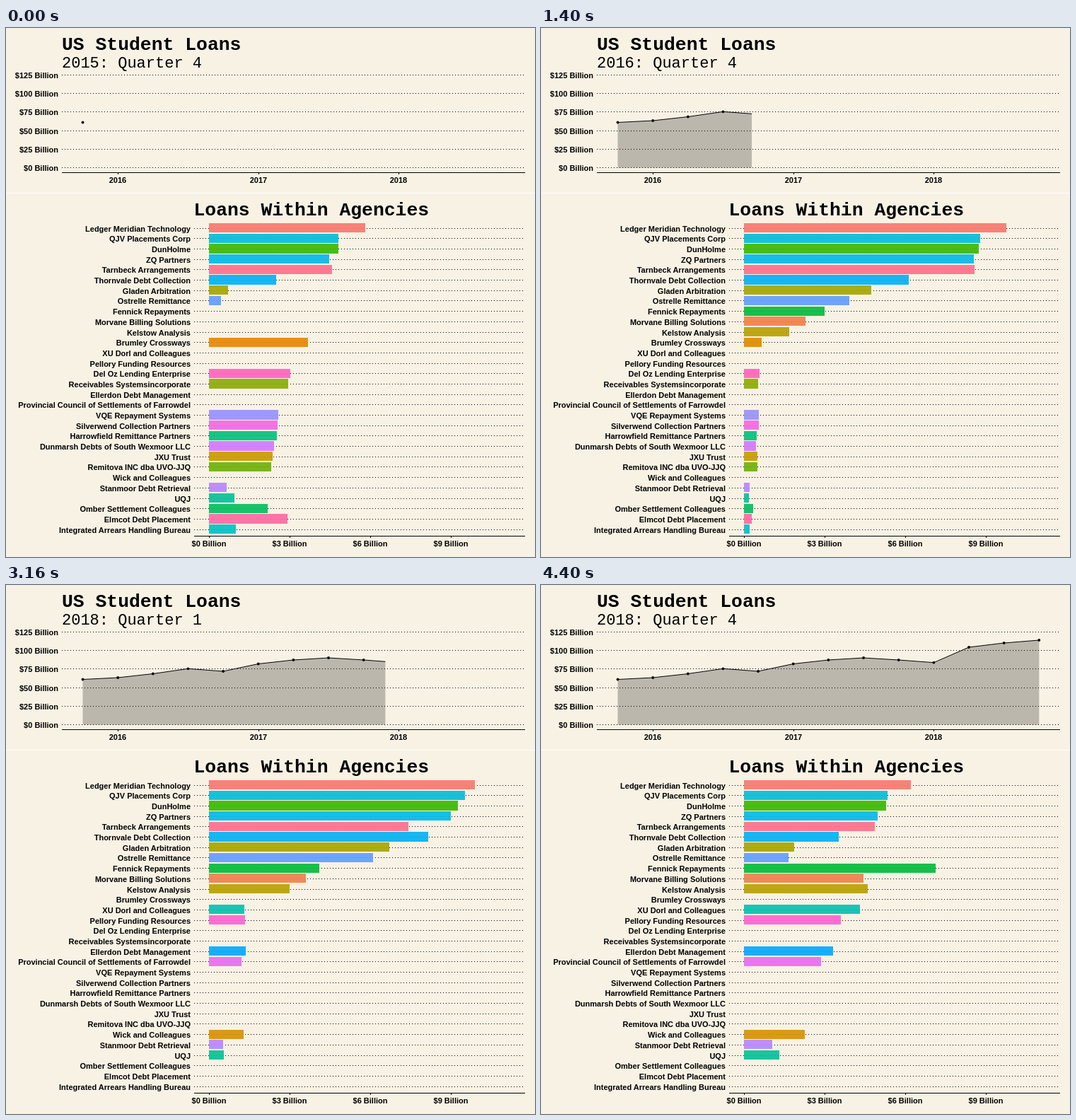
These frames come from a looping animation (748 by 748 pixels, 4.42 s). An HTML page:

```html
<!DOCTYPE html>
<html lang="en">
<head>
<meta charset="utf-8">
<title>US Student Loans</title>
<style>
  html, body { margin: 0; height: 100%; overflow: hidden; background: #f8f2e4; }
  svg { display: block; width: 100vw; height: 100vh; }
  text { font: bold 11px Arial, "Liberation Sans", sans-serif; }
  .title, .sub { font: bold 26.4px "Courier New", "Liberation Mono", monospace; }
  .sub { font-size: 22px; font-weight: normal; }
  .end { text-anchor: end; }
  .mid { text-anchor: middle; }
  .axis, .grid { stroke: #000; shape-rendering: crispEdges; }
  .grid { stroke-dasharray: 1 3; }
  .bar { fill-opacity: .9; shape-rendering: crispEdges; }
</style>
</head>
<body>
<svg id="stage" viewBox="0 0 748 748"></svg>
<script>
const FRAMES = 221, STEP = 20, STATES = 13, SPAN = 17, HOLD = 9;
const stage = document.getElementById('stage');
const lerp = (a, b, p) => a + (b - a) * p;

function add(tag, attrs, content = '') {
  const el = document.createElementNS('http://www.w3.org/2000/svg', tag);
  for (const k in attrs) el.setAttribute(k, attrs[k]);
  el.textContent = content;
  return stage.appendChild(el);
}
const label = (cls, x, y, s) => add('text', { class: cls, x, y }, s);
const line = (cls, x1, y1, x2, y2) => add('line', { class: cls, x1, y1, x2, y2 });

// Evenly spaced hues in polar CIE-LUV, luminance 65, chroma 100
function hue(rank) {
  const h = (15 + 12 * rank) * Math.PI / 180, L = 65;
  const u = 100 * Math.cos(h) / (13 * L) + 0.19784;
  const v = 100 * Math.sin(h) / (13 * L) + 0.46834;
  const Y = ((L + 16) / 116) ** 3;
  const X = 9 * Y * u / (4 * v), Z = Y * (12 - 3 * u - 20 * v) / (4 * v);
  const channel = c => {
    c = c > 0.00304 ? 1.055 * c ** (1 / 2.4) - 0.055 : 12.92 * c;
    return Math.round(255 * Math.min(1, Math.max(0, c)));
  };
  return `rgb(${channel(3.2405 * X - 1.5371 * Y - 0.4985 * Z)},` +
    `${channel(-0.9693 * X + 1.876 * Y + 0.0416 * Z)},` +
    `${channel(0.0556 * X - 0.204 * Y + 1.0572 * Z)})`;
}

// Upper chart
const totals = [133.5, 131, 125.5, 118.3, 122, 111.5, 106, 103, 106, 109.7, 88, 82, 78];
const BASE = 197.7;
const quarterX = q => 108.5 + 49.65 * q;

label('title', 79, 31, 'US Student Loans');
const subtitle = label('sub', 79, 56, '');
for (let i = 0; i < 6; i++) {
  const y = Math.floor(BASE - 26.3 * i);
  line('grid', 79, y + .5, 734, y + .5);
  label('end', 74, y + 5, `$${25 * i} Billion`);
}
line('axis', 79, 204.5, 734, 204.5);
[158, 357, 555].forEach((x, i) => {
  line('axis', x + .5, 204, x + .5, 207);
  label('mid', x, 219, 2016 + i);
});
const area = add('path', { fill: '#000', 'fill-opacity': .245 });
const curve = add('path', { fill: 'none', stroke: '#000' });
const dots = totals.map((y, q) => add('circle', { cx: quarterX(q), cy: y, r: 1.9 }));
add('rect', { y: 233, width: 748, height: 1, fill: '#fff' });

// Lower chart
label('title', 265.5, 264.5, 'Loans Within Agencies');
line('axis', 266, 718.5, 734, 718.5);
for (let i = 0; i < 4; i++) {
  const x = 287 + 114 * i;
  line('axis', x + .5, 718, x + .5, 721);
  label('mid', x, 733, `$${3 * i} Billion`);
}

// Where each odd quarter lies between its even neighbours
const lead = [.53, .15, .96, .75, .85, .5];
const rise = [.5, .45, .6, 1.5, -.15, .75];
const late = [0, 0, 0, 1, -.1, .6];
const fade = [.5, .08, .4, 1, .15, .5];
const bars = [];

// sizes: bar lengths at every second quarter
function bar(mix, rank, name, ...sizes) {
  if (mix === fade) sizes.splice(3, 0, sizes[2] * .35);
  const y = 282.6 + 14.69 * bars.length, top = Math.round(y - 6.6);
  line('grid', 266, Math.round(y) + .5, 734, Math.round(y) + .5);
  label('end', 261, Math.round(y + 5), name);
  const el = add('rect', {
    class: 'bar', x: 287, y: top, height: Math.round(y + 6.6) - top, fill: hue(rank)
  });
  bars.push({ el, mix, sizes });
}

bar(lead, 0, 'Ledger Meridian Technology', 220.5, 290.5, 371, 425, 393.5, 373, 347);
bar(lead, 16, 'QJV Placements Corp', 183, 251, 334, 401, 374, 360, 342);
bar(lead, 9, 'DunHolme', 183, 251, 332, 399, 369, 349, 326);
bar(lead, 17, 'ZQ Partners', 170, 240, 325, 383, 356, 340, 321);
bar(lead, 29, 'Tarnbeck Arrangements', 174, 244, 326, 322, 296, 279, 261);
bar(rise, 18, 'Thornvale Debt Collection', 94.5, 123, 233, 302, 321, 395, 408);
bar(rise, 6, 'Gladen Arbitration', 27, 54, 180, 249, 265, 334, 376);
bar(rise, 20, 'Ostrelle Remittance', 17, 40, 149, 221, 244, 321, 382);
bar(rise, 10, 'Fennick Repayments', 0, 30, 114, 150, 161, 196, 271);
bar(rise, 1, 'Morvane Billing Solutions', 0, 18, 87, 122, 139, 150, 169);
bar(rise, 5, 'Kelstow Analysis', 0, 22, 64, 99, 118, 143, 175);
bar(fade, 2, 'Brumley Crossways', 140, 133, 25);
bar(late, 14, 'XU Dorl and Colleagues', 0, 0, 0, 31, 54, 93, 164);
bar(late, 26, 'Pellory Funding Resources', 0, 0, 0, 31, 55, 93, 137);
bar(fade, 27, 'Del Oz Lending Enterprise', 115, 111, 22);
bar(fade, 7, 'Receivables Systemsincorporate', 112, 108, 20);
bar(late, 19, 'Ellerdon Debt Management', 0, 0, 0, 31, 54, 78, 126);
bar(late, 24, 'Provincial Council of Settlements of Farrowdel', 0, 0, 0, 31, 50, 90, 109);
bar(fade, 21, 'VQE Repayment Systems', 98, 93, 21);
bar(fade, 25, 'Silverwend Collection Partners', 97, 92, 21);
bar(fade, 12, 'Harrowfield Remittance Partners', 96, 91, 18);
bar(fade, 23, 'Dunmarsh Debts of South Wexmoor LLC', 92, 88, 17);
bar(fade, 4, 'JXU Trust', 90, 84, 19);
bar(fade, 8, 'Remitova INC dba UVO-JJQ', 88, 82, 19);
bar(late, 3, 'Wick and Colleagues', 0, 0, 0, 31, 50, 62, 86);
bar(fade, 22, 'Stanmoor Debt Retrieval', 25, 10, 8, 0, 135, 144);
bar(fade, 13, 'UQJ', 36, 10.5, 7, 0, 137, 147);
bar(fade, 11, 'Omber Settlement Colleagues', 83, 80, 13);
bar(fade, 28, 'Elmcot Debt Placement', 111, 16.5, 11);
bar(fade, 15, 'Integrated Arrears Handling Bureau', 38, 35.5, 8);

function level({ mix, sizes }, state) {
  const i = state >> 1, a = sizes[i] || 0;
  return state % 2 ? lerp(a, sizes[i + 1] || 0, mix[i]) : a;
}

function drawCurve(q) {
  const k = Math.floor(q), x = quarterX(q);
  const pts = totals.slice(0, k + 1).map((y, i) => `${quarterX(i)} ${y}`);
  if (q > k) pts.push(`${x} ${lerp(totals[k], totals[k + 1], q - k)}`);
  const d = 'M' + pts.join('L');
  curve.setAttribute('d', d);
  area.setAttribute('d', `${d}V${BASE}H${quarterX(0)}Z`);
  dots.forEach((dot, i) => dot.setAttribute('visibility', i <= q ? 'visible' : 'hidden'));
}

// Each quarter rests, then slides on; bars that enter or leave switch at the end
function drawBars(state, p) {
  for (const b of bars) {
    const from = level(b, state), to = level(b, (state + 1) % STATES);
    b.el.setAttribute('width', from && to ? lerp(from, to, p) : from);
  }
}

let shown = -1;
function draw(frame) {
  if (frame === shown) return;
  shown = frame;
  const state = Math.floor(frame / SPAN);
  const p = Math.max(0, (frame % SPAN - HOLD) / (SPAN - HOLD));
  const quarter = state + 3;
  subtitle.textContent = `${2015 + (quarter >> 2)}: Quarter ${quarter % 4 + 1}`;
  drawCurve(frame * (STATES - 1) / (FRAMES - 1));
  drawBars(state, p);
}

const start = performance.now();
function tick() {
  draw(Math.floor((performance.now() - start + .1) / STEP) % FRAMES);
  requestAnimationFrame(tick);
}
tick();
</script>
</body>
</html>
```
